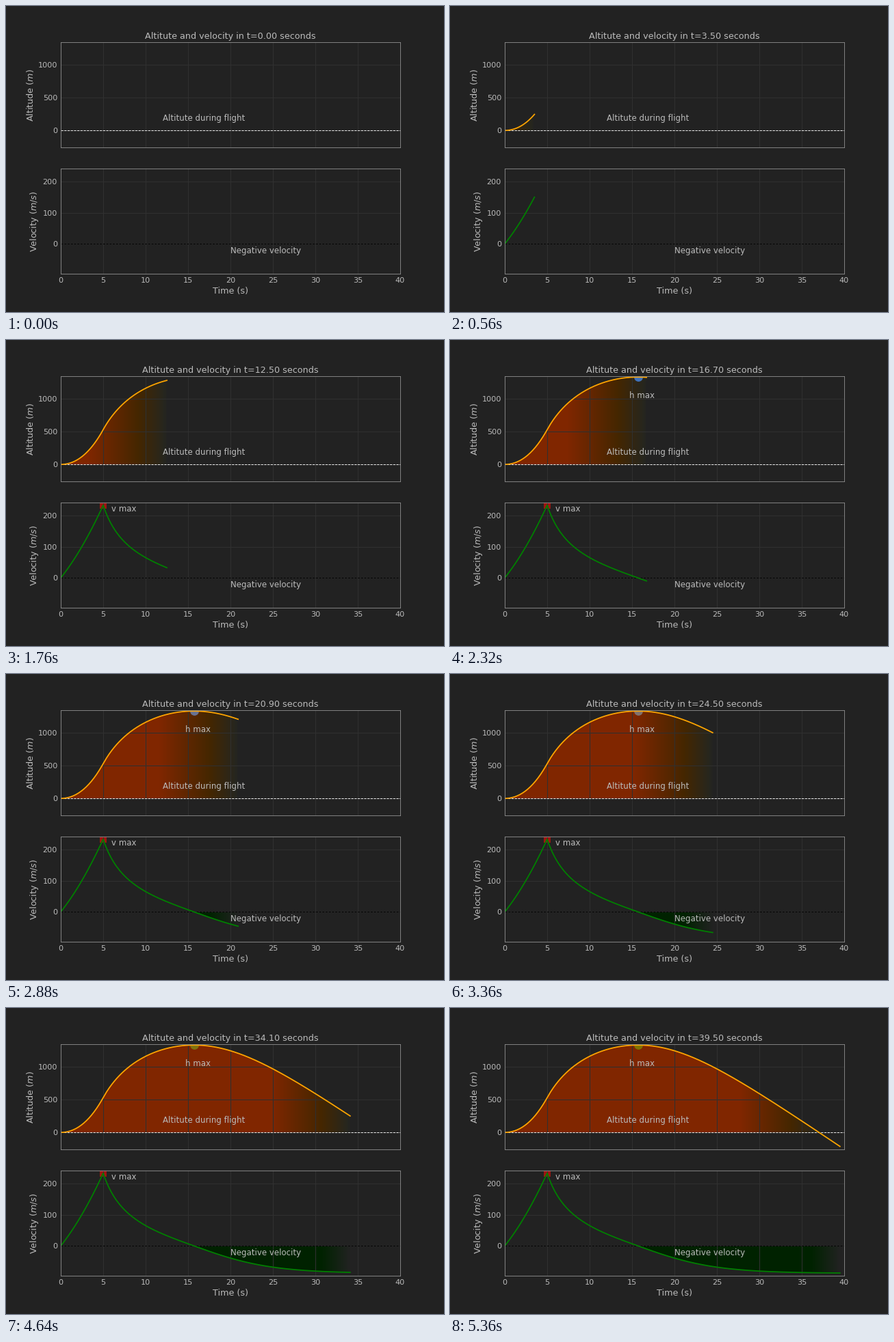
Write a matplotlib script that moves like this. It is 640 by 448 pixels and loops after 5.44 s.

```python
import numpy as np
import matplotlib.pyplot as plt
from matplotlib.animation import FuncAnimation
from matplotlib.path import Path

BG, FG, EDGE, GRID = "#222222", "#bbbbbb", "#8c8c8c", "#303030"
BASE = 0x22
FRAMES, INTERVAL = 68, 80

plt.rcParams.update({
    "font.family": "DejaVu Sans", "text.color": FG, "axes.labelcolor": FG,
    "xtick.color": FG, "ytick.color": FG, "axes.edgecolor": EDGE,
    "figure.facecolor": BG, "axes.facecolor": BG, "axes.linewidth": 1.0,
    "axes.titlesize": 14.4, "axes.labelsize": 14.4,
    "xtick.labelsize": 12.6, "ytick.labelsize": 12.6,
    "axes.axisbelow": "line",
})

# Rocket flight: powered climb, then coasting and falling with quadratic drag
G, V_UP, V_DOWN = 9.81, 86.2, 88.0
T_BURN, T_TOP, H_TOP = 5.0, 15.7, 1337.0


def coast(t):
    up = np.clip(G * (T_TOP - t) / V_UP, 0, 1.3)
    down = np.maximum(G * (t - T_TOP) / V_DOWN, 0)
    v = V_UP * np.tan(up) - V_DOWN * np.tanh(down)
    climb = V_UP ** 2 / G * np.log(np.cos(up))
    drop = V_DOWN ** 2 / G * np.log(np.cosh(down))
    return H_TOP + climb - drop, v


H_BURN, V_BURN = coast(T_BURN)
quad = (V_BURN * T_BURN / 2 - H_BURN) * 6 / T_BURN ** 3
lin = V_BURN / T_BURN - quad * T_BURN

time = np.arange(401) * 0.1
h_coast, v_coast = coast(time)
burning = time <= T_BURN
alt = np.where(burning, lin * time ** 2 / 2 + quad * time ** 3 / 3, h_coast)
vel = np.where(burning, lin * time + quad * time ** 2, v_coast)
landing = np.count_nonzero(alt >= 0)

fig, (ax_h, ax_v) = plt.subplots(2, 1, figsize=(10, 7), dpi=64)
fig.subplots_adjust(left=0.125, right=0.9, bottom=0.125, top=0.8815, hspace=0.2)


def setup(ax, ylim, ticks, label, zero_color):
    ax.set(xlim=(0, 40), ylim=ylim, xticks=range(0, 41, 5), yticks=ticks)
    ax.set_ylabel(label, labelpad=4)
    ax.tick_params(length=0, pad=5.6)
    ax.grid(True, color=GRID, linestyle="-", linewidth=1.2)
    ax.axhline(0, color=zero_color, linestyle="--", linewidth=1, zorder=2.1)


def make_fill(ax, values):
    """Strip image clipped to the area between a curve and zero."""
    im = ax.imshow(np.zeros((1, 400, 4), np.uint8), aspect="auto",
                   extent=(*ax.get_xlim(), *ax.get_ylim()),
                   interpolation="nearest", zorder=1)
    outline = np.vstack([[0, 0], np.column_stack([time, values]), [40, 0], [0, 0]])
    im.set_clip_path(Path(outline), ax.transData)
    return im


def note(ax, x, y, text):
    return ax.text(x, y, text, fontsize=13.2)


setup(ax_h, (-261, 1349), (0, 500, 1000), "Altitude ($m$)", "white")
setup(ax_v, (-96, 242.5), (0, 100, 200), "Velocity ($m/s$)", "black")
ax_h.tick_params(labelbottom=False)
ax_v.set_xlabel("Time (s)", labelpad=4)
fill_h = make_fill(ax_h, np.maximum(alt, 0))
fill_v = make_fill(ax_v, np.minimum(vel, 0))

line_h, = ax_h.plot([], [], color="orange", linewidth=2, zorder=2.2)
line_v, = ax_v.plot([], [], color="green", linewidth=2, zorder=2.2)
dot_h, = ax_h.plot(T_TOP, H_TOP, "o", ms=14.5, mew=0, zorder=1.2)
dot_v, = ax_v.plot(T_BURN, V_BURN, "s", ms=12, mew=0, color="#9c1612", zorder=1.2)

note(ax_h, 12, 150, "Altitute during flight")
note(ax_v, 20, -30, "Negative velocity")
note_h = note(ax_h, 14.7, 1015, "h max")
note_v = note(ax_v, 6, 213, "v max")
title = ax_h.set_title(" ")


def strip(r, g, b, layers):
    return np.stack([r, g, b, np.where(layers > 0, 255, 0)], -1).astype(np.uint8)[None]


def count_layers(step):
    return np.maximum(step - np.arange(400), 0)


def update(i):
    step = max(6 * i - 7, 1) if i else 0
    title.set_text(f"Altitute and velocity in t={step / 10:.2f} seconds")
    line_h.set_data(time[:step + 1], alt[:step + 1])
    line_v.set_data(time[:step + 1], vel[:step + 1])

    # Each 0.1 s adds one faint layer, so colour builds up behind the tip
    n = count_layers(min(step, landing))
    fill_h.set_data(strip(np.minimum(BASE + n, 128), np.minimum(BASE + n, 38),
                          np.maximum(BASE - n, 0), n))
    n = count_layers(step)
    fade = np.maximum(BASE - n, 0)
    fill_v.set_data(strip(fade, np.full(400, BASE), fade, n))

    past_top = step - round(T_TOP * 10)
    n = max(past_top, 0)
    dot_h.set_color((min(53 + n, 128) / 255, 114 / 255, max(198 - n, 0) / 255))
    for item in (dot_h, note_h):
        item.set_visible(past_top > 0)
    for item in (dot_v, note_v):
        item.set_visible(step >= T_BURN * 10)
    return []


anim = FuncAnimation(fig, update, frames=FRAMES, interval=INTERVAL, repeat=True)
plt.show()
```
